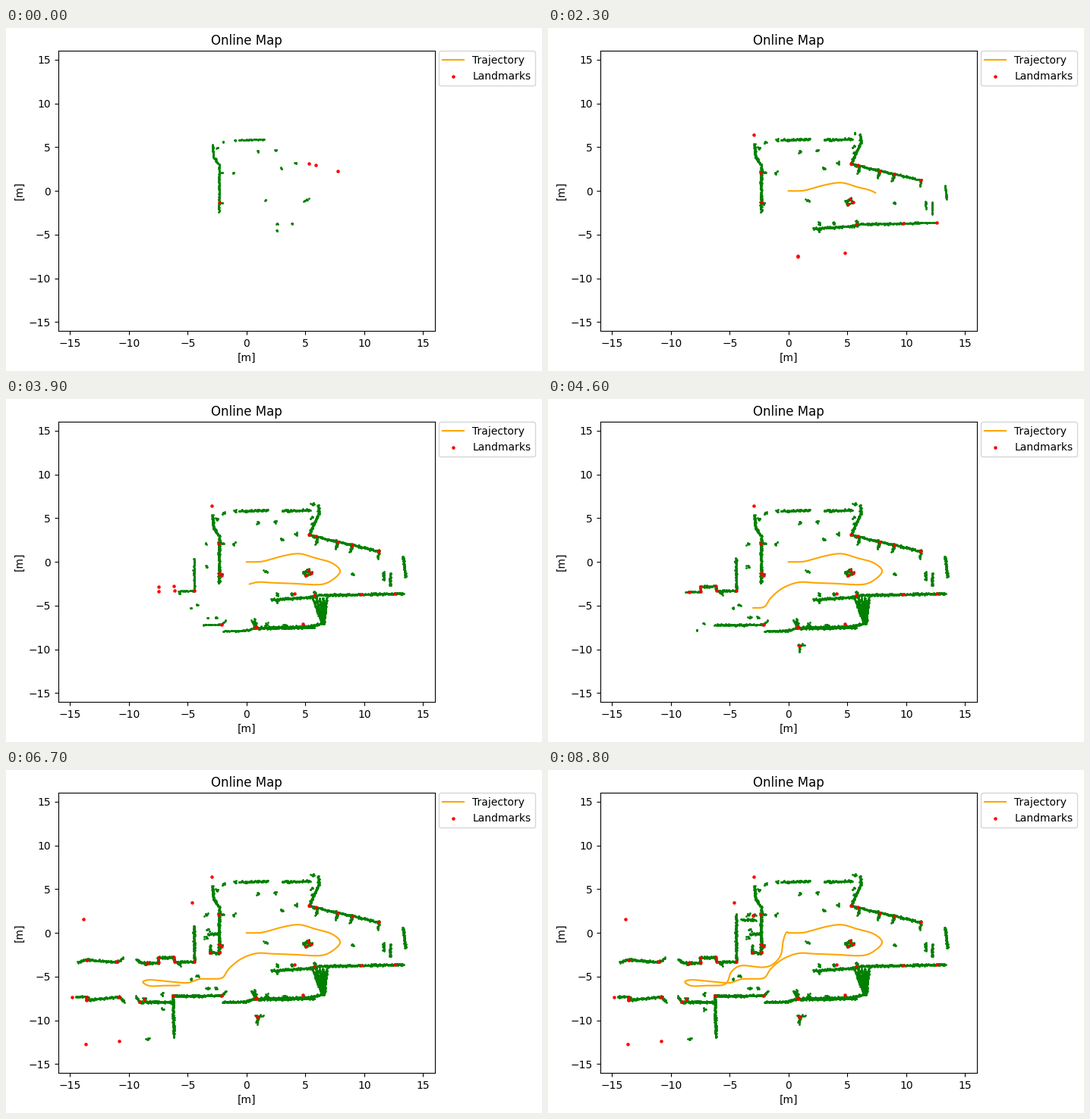
Write a matplotlib script that moves like this. It is 706 px wide and 453 px high and loops after 8900 ms.

```python
import numpy as np
import matplotlib.pyplot as plt
from matplotlib.animation import FuncAnimation

W, H, DPI = 706, 453, 100
FRAMES, STEP = 89, 100
SCAN_RANGE, CORNER_RANGE = 6.1, 8.1
rng = np.random.default_rng(7)

# Driven path in metres, one leg per (end frame, key points)
LEGS = [
    (0, [(0, 0)]),
    (15, [(.8, 0), (1.5, .1), (3.15, .7)]),
    (33, [(4.5, .94), (5.8, .47), (7.2, -.08), (7.95, -1), (7.4, -1.95),
          (6.3, -2.58), (4.1, -2.48)]),
    (46, [(2.4, -2.4), (.85, -2.33), (-.5, -3), (-1.5, -4.1),
          (-2.05, -5.12), (-3, -5.25)]),
    (67, [(-4, -5.28), (-5, -5.7), (-6.5, -5.56), (-7.9, -5.38), (-8.5, -5.4),
          (-8.8, -5.65), (-8.2, -6.06), (-7, -6.02), (-5.7, -5.98)]),
    (78, [(-5.2, -5.6), (-4.85, -4.45), (-4, -3.74), (-2.2, -3.93),
          (-1.3, -3.55)]),
    (88, [(-.65, -2.5), (-.45, -.9), (-.2, .03), (0, .03)]),
]

# Wall beside the upper aisle, with short posts below it
AISLE = (5.3, 3.1), (11.25, 1.25)
posts = [[(x, y - .1), (x - .12, y - .75)]
         for x in (6, 7.7, 8.95) for y in [np.interp(x, *zip(*AISLE))]]
shaft = [[(x, -4.1), (6.4 + .15 * (x - 5.6), -7)]
         for x in np.linspace(5.6, 6.8, 5)]

# Rooms: first frame in view, walls, clutter
ROOMS = [
    (0, [[(-2.9, 5.3), (-2.8, 3.8), (-2.33, 3), (-2.33, -2.35)],
         [(-.65, 5.85), (1.8, 5.9)], [(3.1, 5.85), (5.4, 5.95)],
         [(6.1, 6.5), (6.15, 5.6), *AISLE, (11.15, .5)],
         [(4.85, -1.2), (5.25, -.9)],
         [(13.3, .6), (13.5, -1.7)], [(11.65, -1.2), (11.65, -2)],
         [(12.2, -1.3), (12.2, -2.7)], *posts],
     [(-2.5, 4.9), (-2, 5.6), (-2.6, 3.7), (-1, 5.8), (.95, 4.55), (2.45, 4.65),
      (2.95, 2.6), (4.15, 3.2), (-1.1, 2.1), (-2.1, 2.1), (-2.1, -1.4),
      (1.6, -1.1), (2.6, -3.7), (3.9, -3.7), (2.6, -4.55), (5.6, 5.1),
      (5.6, 4.4), (5.6, 6.6), (9, -1.3)]),
    (12, [[(2.1, -4.3), (3.9, -4.15), (5.9, -3.95)],
          [(5.9, -3.8), (13.25, -3.6)],
          [(.7, -6.6), (.8, -7.5), (5.4, -7.35), (6.4, -7)]],
     [(4.45, -4.1), (5.75, -3.4), (1.7, -7.1), (3.3, -7.2)]),
    (20, [[(4.85, -1.2), (5.25, -.9), (5.5, -1.3), (5.05, -1.5), (4.85, -1.2)]],
     []),
    (35, [[(.4, -6.7), (.85, -7.5), (-.2, -7.85), (-2, -7.9)],
          [(1, -7.6), (5.8, -7.5)],
          [(-1.8, -6.7), (-2.1, -7.15), (-6.3, -7.2)],
          [(-4.45, .4), (-4.45, -3.3), (-6.1, -3.3), (-6.2, -2.75),
           (-7.5, -2.8), (-7.5, -3.4), (-8.9, -3.4), (-9.4, -3)],
          [(.8, -9.5), (1.35, -9.5)], [(.95, -9.5), (.9, -10.3)], *shaft],
     [(-3.45, 2.1), (-3.45, -.5), (-4.2, -4.9), (-4.7, -5.3), (-3.3, -6.4),
      (-2.6, -6.3), (-7.2, -7), (-7.75, -7.8), (-5.7, -3.6)]),
    (47, [[(-3.8, -7.2), (-6.25, -7.2), (-6.2, -11.95)],
          [(-6.2, -7.9), (-9.1, -7.9), (-9.4, -7.3)],
          [(-10.5, -2.9), (-11, -3.3), (-13.6, -3.05), (-14.4, -3.35)],
          [(-10.4, -7.9), (-10.8, -7.3), (-13.6, -7.65), (-13.6, -7.3),
           (-14.5, -7.3)],
          [(-3.3, -.1), (-2.33, -.1)], [(-4.45, 2.1), (-4.45, .4)],
          [(-3.1, -1.5), (-3.1, -2.25), (-2.33, -2.25), (-2.33, -1.5)],
          [(-4, 1.5), (-2.8, 1.5)]],
     [(-7.1, -8.7), (-8.4, -12.1), (-8.6, -3.6), (-13.5, -3.1), (-13.5, -7.5),
      (-2.9, 2), (-3.3, .4), (-8.7, -7.5)]),
]

# Landmarks away from wall corners: first frame, x, y
LONE = [
    (0, 5.9, 2.95), (0, 7.75, 2.3), (0, -2.3, -1.3), (4, -2.95, 6.4),
    (5, -2.35, 2.1), (8, .8, -7.45), (17, 4.8, -7.1), (18, 8.95, 1.9),
    (21, 5.75, -3.8), (22, 9.75, -3.7), (23, 12.6, -3.6), (31, 4.1, -3.6),
    (39, -2.1, -1.5), (41, .9, -9.6), (44, -8.45, -3.45), (50, -4.6, 3.45),
    (52, -8.7, -7.6), (56, -13.6, -3.1), (59, -14.85, -7.35),
    (60, -13.85, 1.6), (61, -10.85, -12.4), (62, -13.65, -12.75),
    (72, -3, 2.05),
]


def smooth(pts, sub):
    """Catmull-Rom curve through pts."""
    p = np.vstack([pts[0], pts, pts[-1]])
    u = np.linspace(0, 1, sub, endpoint=False)[:, None]
    out = [.5 * (2 * b + (c - a) * u + (2 * a - 5 * b + 4 * c - d) * u**2
                 + (3 * b - a - 3 * c + d) * u**3)
           for a, b, c, d in zip(p, p[1:], p[2:], p[3:])]
    return np.vstack(out + [p[-1:]])


SUB = 12
path = smooth(np.array([p for _, leg in LEGS for p in leg], float), SUB)
dist = np.r_[0, np.cumsum(np.hypot(*np.diff(path, axis=0).T))]
ends = (np.cumsum([len(leg) for _, leg in LEGS]) - 1) * SUB
# The robot pulls away slowly, then holds an even speed on each leg
knot_t = np.insert([t for t, _ in LEGS], 1, 5)
knot_d = np.insert(dist[ends], 1, .4)
gone = np.interp(np.arange(FRAMES), knot_t, knot_d)
robot = np.column_stack([np.interp(gone, dist, path[:, k]) for k in (0, 1)])


def first_seen(pts, start, reach):
    """First frame from start on with the robot within reach, else inf."""
    gap = np.linalg.norm(pts[:, None] - robot[None], axis=2)
    near = (gap < reach) & (np.arange(FRAMES) >= start)
    return np.where(near.any(1), near.argmax(1), np.inf)


def sample(poly, per_metre=16):
    parts = []
    for a, b in zip(poly, poly[1:]):
        n = max(3, int(np.hypot(*np.subtract(b, a)) * per_metre))
        parts.append(np.linspace(a, b, n))
    return np.vstack(parts)


def scan(pts, start, tight, loose):
    """Sharp first sighting, then later scans that spread the points."""
    born = first_seen(pts, start, SCAN_RANGE)
    again = born + 1 + rng.exponential(6, len(pts))
    return np.vstack([
        np.column_stack([t, pts + rng.uniform(-1, 1, pts.shape) * spread])
        for t, spread in ((born, tight), (again, loose))])


def corners(poly):
    """Inner vertices where the wall turns sharply."""
    p = np.array(poly, float)
    v = np.diff(p, axis=0)
    turn = np.diff(np.unwrap(np.arctan2(v[:, 1], v[:, 0])))
    return p[1:-1][np.abs(turn) > np.radians(40)]


def by_birth(rows):
    rows = np.vstack(rows)
    return rows[np.argsort(rows[:, 0], kind="stable")]


cloud, marks = [], [np.array(LONE, float)]
for start, walls, clutter in ROOMS:
    for wall in walls:
        cloud.append(scan(sample(wall), start, (.03, .05), (.09, .13)))
        bends = corners(wall)
        born = first_seen(bends, start, CORNER_RANGE)
        marks.append(np.column_stack([born, bends]))
    for spot in clutter:
        cloud.append(scan(np.tile(spot, (4, 1)), start, (.06, .08), (.16, .2)))
cloud, marks = by_birth(cloud), by_birth(marks)

fig = plt.figure(figsize=(W / DPI, H / DPI), dpi=DPI)
ax = fig.add_axes([68.8 / W, 53 / H, 496 / W, 369.6 / H])
ax.set(xlim=(-16, 16), ylim=(-16, 16), xlabel="[m]", ylabel="[m]",
       title="Online Map")
green = ax.scatter([], [], s=1, c="green")
line, = ax.plot([], [], color="orange", label="Trajectory")
red = ax.scatter([], [], s=5, c="red", label="Landmarks")
ax.legend(handles=[line, red], loc="upper left", bbox_to_anchor=(1.01, 1),
          borderaxespad=0, scatterpoints=1)


def seen(rows, frame):
    return rows[:np.searchsorted(rows[:, 0], frame, side="right"), 1:]


def draw(frame):
    green.set_offsets(seen(cloud, frame))
    red.set_offsets(seen(marks, frame))
    trail = np.vstack([path[dist < gone[frame]], robot[frame]])
    line.set_data(trail[:, 0], trail[:, 1])
    return green, line, red


anim = FuncAnimation(fig, draw, frames=FRAMES, interval=STEP,
                     init_func=lambda: draw(0), repeat=True, repeat_delay=0)
plt.show()
```
